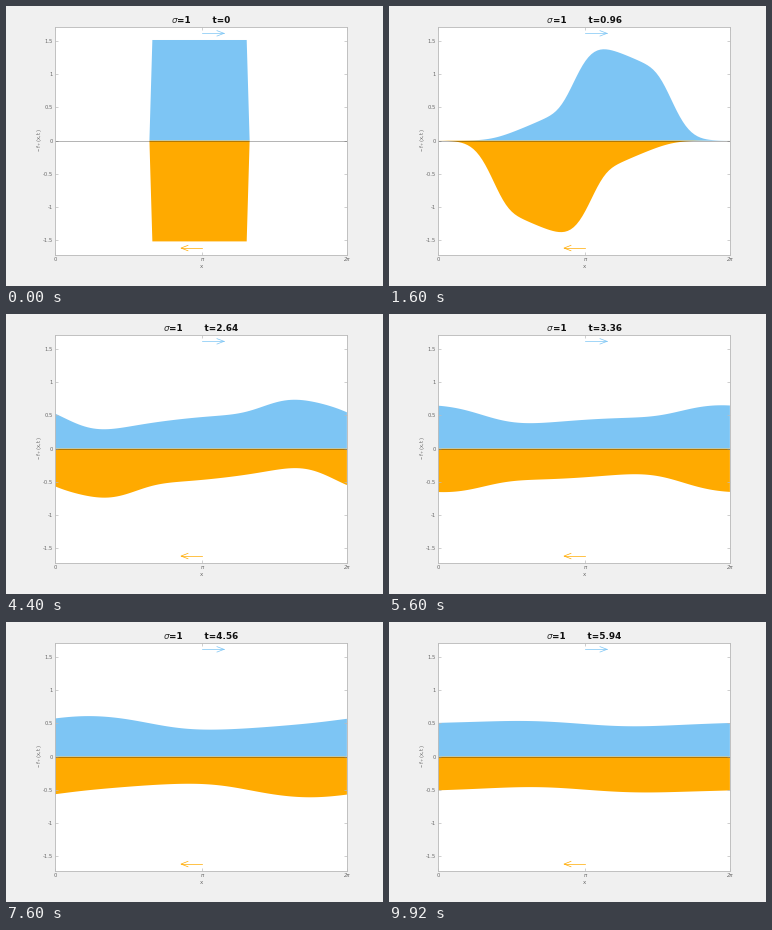
A matplotlib script that plays this animation: 377 px wide and 280 px high, repeating every 10000 ms.

```python
import numpy as np
import matplotlib.pyplot as plt
from matplotlib.animation import FuncAnimation

W, H, DPI = 377, 280, 64
FRAMES, INTERVAL = 125, 80
PT = 72 / DPI  # points per pixel

BLUE, ORANGE = "#7dc5f4", "#ffaa00"
GREY, INK = "#bcbcbc", "#6a6a6a"

N = 100
RATE = 0.5  # turning rate, sigma / 2
STEP, STORED = 0.03, 200

plt.rcParams["font.family"] = "DejaVu Sans"


def solve():
    """Right and left movers on a ring: upwind in space, implicit Euler in time."""
    dx = 2 * np.pi / N
    eye = np.eye(N)
    move_right = (np.roll(eye, 1, axis=0) - eye) / dx
    move_left = (np.roll(eye, -1, axis=0) - eye) / dx
    rates = np.block([[move_right - RATE * eye, RATE * eye],
                      [RATE * eye, move_left - RATE * eye]])
    advance = np.linalg.inv(np.eye(2 * N) - STEP * rates)

    start = np.zeros(N)
    start[N // 3:2 * N // 3] = 1
    start *= 0.5 / start.mean()
    states = [np.r_[start, start]]
    for _ in range(STORED - 1):
        states.append(advance @ states[-1])
    return states


x = np.linspace(0, 2 * np.pi, N)
states = solve()
peak = states[0].max()
top = peak + 0.2
mid = x[N // 2]

fig = plt.figure(figsize=(W / DPI, H / DPI), dpi=DPI, facecolor="#f0f0f0")
ax = fig.add_axes([49.1 / W, 1 - 248.7 / H, 291.8 / W, 228 / H])
ax.set(xlim=(0, 2 * np.pi), ylim=(-top, top))
ax.set_xticks([0, mid, 2 * np.pi], ["0", "π", "2π"])
ax.set_yticks(np.arange(-1.5, 2, 0.5),
              ["-1.5", "-1", "-0.5", "0", "0.5", "1", "1.5"])
ax.tick_params(direction="in", top=True, right=True, length=3 * PT,
               width=0.7 * PT, pad=2.3 * PT, color=GREY, labelcolor=INK,
               labelsize=5.3 * PT)
for tick_label in ax.get_xticklabels()[1:]:
    tick_label.set_style("italic")
for spine in ax.spines.values():
    spine.set(color=GREY, linewidth=0.9 * PT)


def label(px, py, text, size, **style):
    style = {"ha": "center", "va": "center", "color": INK, **style}
    return fig.text(px / W, 1 - py / H, text, fontsize=size * PT, **style)


def area(color):
    return ax.fill([0, 0, 0], [0, 0, 0], color=color, linewidth=0)[0]


def arrow(y, direction, color):
    px = 2 * np.pi / 292
    py = 2 * top / 228
    tip = mid + direction * 21.5 * px
    back = tip - direction * 7 * px
    line = {"color": color, "linewidth": 0.7 * PT}
    ax.plot([mid, tip], [y, y], **line)
    ax.plot([back, tip, back], [y + 2.7 * py, y, y - 2.7 * py], **line)


upper, lower = area(BLUE), area(ORANGE)
ax.axhline(0, color="black", alpha=0.32, linewidth=0.9 * PT)
arrow(peak + 0.1, 1, BLUE)
arrow(-peak - 0.1, -1, ORANGE)

label(195.3, 260.7, "x", 5.5)
label(33.7, 134.5, r"$\mathregular{_{-}\ f_{+}(x,t)}$", 5.3, rotation=90)
title = label(198.1, 17, "", 8.9, va="baseline", weight="bold", color="#101010")
ax.annotate("σ", xy=(0, H - 17), xycoords=(title, "figure pixels"),
            ha="right", va="baseline", fontsize=8.7 * PT, style="italic",
            color="#303030", annotation_clip=False)


def outline(values):
    return np.column_stack([np.r_[x[0], x, x[-1]], np.r_[0, values, 0]])


def update(i):
    k = i * INTERVAL // 50  # states are 50 ms apart
    right, left = np.split(states[k], 2)
    upper.set_xy(outline(right))
    lower.set_xy(outline(-left))
    title.set_text("=1" + " " * 7 + f"t={k * STEP:.4g}")
    return upper, lower, title


anim = FuncAnimation(fig, update, frames=FRAMES, interval=INTERVAL,
                     repeat=True, repeat_delay=0, blit=False)
plt.show()
```
